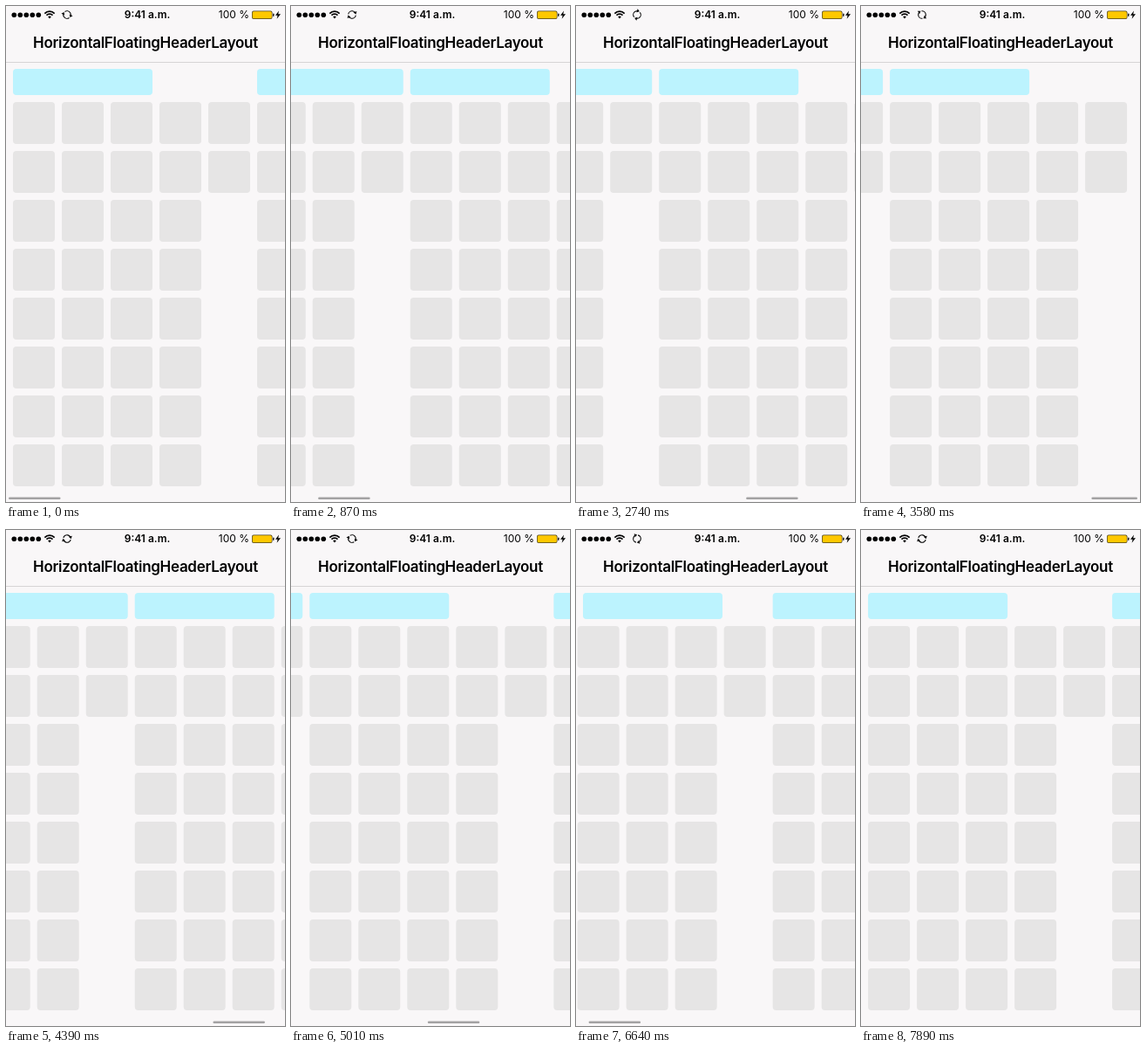
Animation of 320x568 px, one loop 7.92 s. Source, as an HTML page with a canvas:

```html
<!DOCTYPE html>
<html lang="en">
<head>
<meta charset="utf-8">
<title>HorizontalFloatingHeaderLayout</title>
<style>
  html, body { margin: 0; width: 100%; height: 100%; overflow: hidden; background: #f9f7f8; }
  #stage { position: relative; width: 320px; height: 568px; overflow: hidden; }
  canvas { position: absolute; left: 0; top: 0; width: 320px; height: 568px; }
  .text {
    position: absolute; color: #000; white-space: nowrap;
    font-family: Inter, "Liberation Sans", sans-serif;
  }
  .bar { top: 2px; font-size: 12px; line-height: 16px; }
  #clock { left: 0; width: 324px; text-align: center; font-weight: 600; }
  #charge { right: 41px; }
  #title {
    left: 0; top: 31px; width: 320px; text-align: center;
    font-size: 17px; line-height: 22px; font-weight: 600; letter-spacing: -0.3px;
  }
</style>
</head>
<body>
<div id="stage">
  <canvas id="view"></canvas>
  <div class="text bar" id="clock">9:41 a.m.</div>
  <div class="text bar" id="charge">100 %</div>
  <div class="text" id="title">HorizontalFloatingHeaderLayout</div>
</div>
<script>
const W = 320, H = 568, LOOP = 7920;
const PAD = 8, CELL = 48, STEP = 56, ROWS = 8;
const SECTIONS = 6, SECTION_W = 272, SECTION_STEP = 280, HEADER_W = 160;
const CONTENT_W = PAD + SECTIONS * SECTION_STEP;
const MAX = CONTENT_W - W;
const SPRING = 8.5;

const canvas = document.getElementById('view');
const ctx = canvas.getContext('2d');
const ratio = window.devicePixelRatio || 1;
canvas.width = W * ratio;
canvas.height = H * ratio;

// Each key: time in ms, scroll offset, speed in px/s
const forward = [[180, 0, 0], [1640, 497.3, 450], [2740, 1032, 800], [3200, MAX, 462]];
const back = [[4055, MAX, 0], [5010, 827.3, -600], [5920, 283, -450], [7050, 0, -123]];

function hermite(keys, t) {
  if (t <= keys[0][0]) return keys[0][1];
  const i = keys.findIndex(k => k[0] >= t);
  const [t0, p0, v0] = keys[i - 1], [t1, p1, v1] = keys[i];
  const d = (t1 - t0) / 1000, u = (t - t0) / (t1 - t0);
  const u2 = u * u, u3 = u2 * u;
  return (2 * u3 - 3 * u2 + 1) * p0 + (u3 - 2 * u2 + u) * d * v0 +
    (3 * u2 - 2 * u3) * p1 + (u3 - u2) * d * v1;
}

// Critically damped bounce past an edge
function bounce([start, edge, speed], t) {
  const s = (t - start) / 1000;
  return edge + speed * s * Math.exp(-SPRING * s);
}

function offsetAt(t) {
  if (t < 3200) return hermite(forward, t);
  if (t < 4055) return bounce(forward[3], t);
  if (t < 7050) return hermite(back, t);
  return bounce(back[3], t);
}

function box(x, y, w, h, r, color) {
  if (x >= W || x + w <= 0) return;
  ctx.fillStyle = color;
  ctx.beginPath();
  ctx.roundRect(x, y, w, h, r);
  ctx.fill();
}

function drawSections(offset) {
  for (let s = 0; s < SECTIONS; s++) {
    const left = PAD + s * SECTION_STEP - offset;
    const headerX = Math.min(Math.max(PAD, left), left + SECTION_W - HEADER_W);
    box(headerX, 72, HEADER_W, 30, 4, '#bcf3fe');
    for (let c = 0; c < 5; c++) {
      const rows = c < 4 ? ROWS : 2;
      for (let r = 0; r < rows; r++) {
        box(left + c * STEP, 110 + r * STEP, CELL, CELL, 4, '#e6e5e5');
      }
    }
  }
}

function drawIndicator(offset, t) {
  const track = W - 6, full = track * W / CONTENT_W;
  const over = Math.max(0, -offset, offset - MAX);
  const width = full - over;
  const p = Math.min(1, Math.max(0, offset / MAX));
  const x = offset > MAX ? 3 + track - width : 3 + p * (track - full);
  ctx.globalAlpha = Math.min(1, Math.max(0, (7800 - t) / 250));
  box(x, 562.5, width, 2.5, 1.25, '#a3a2a3');
  ctx.globalAlpha = 1;
}

function drawSignal() {
  ctx.fillStyle = ctx.strokeStyle = '#000';
  for (let i = 0; i < 5; i++) {
    ctx.beginPath();
    ctx.arc(9.3 + i * 7, 10.3, 2.8, 0, 7);
    ctx.fill();
  }
  ctx.lineWidth = 1.7;
  const a = -Math.PI * 3 / 4, b = -Math.PI / 4;
  for (const r of [5, 8]) {
    ctx.beginPath();
    ctx.arc(50, 14.2, r, a, b);
    ctx.stroke();
  }
  ctx.beginPath();
  ctx.moveTo(50, 14.4);
  ctx.arc(50, 14.2, 2.6, a, b);
  ctx.fill();
}

function drawSync(t) {
  ctx.save();
  ctx.translate(70, 10);
  ctx.rotate(t / 1000 * Math.PI * 2 + 0.5);
  ctx.lineWidth = 1.1;
  for (let i = 0; i < 2; i++) {
    ctx.rotate(Math.PI);
    ctx.beginPath();
    ctx.arc(0, 0, 4.3, 0.45, Math.PI - 0.25);
    ctx.stroke();
    ctx.beginPath();
    ctx.moveTo(-6.3, 2.2);
    ctx.lineTo(-4.5, -1);
    ctx.lineTo(-2.2, 1.8);
    ctx.fill();
  }
  ctx.restore();
}

function drawBattery() {
  box(282, 5.5, 23.5, 9.5, 2, '#4a4020');
  box(282.7, 6.2, 22.1, 8.1, 1.5, '#ffc800');
  box(306, 8.5, 1.5, 3.5, 1, '#222');
  ctx.fillStyle = '#000';
  ctx.beginPath();
  ctx.moveTo(313, 5.5);
  ctx.lineTo(309, 10.8);
  ctx.lineTo(311.6, 10.8);
  ctx.lineTo(310.6, 14.8);
  ctx.lineTo(315, 9.2);
  ctx.lineTo(312.2, 9.2);
  ctx.fill();
}

function draw(now) {
  const t = now % LOOP, offset = offsetAt(t);
  ctx.setTransform(ratio, 0, 0, ratio, 0, 0);
  ctx.fillStyle = '#f9f7f8';
  ctx.fillRect(0, 0, W, H);
  drawSections(offset);
  drawIndicator(offset, t);
  ctx.fillStyle = '#d6d4d5';
  ctx.fillRect(0, 64, W, 1);
  drawSignal();
  drawSync(t);
  drawBattery();
}

const start = performance.now();
function frame() {
  draw(performance.now() - start);
  requestAnimationFrame(frame);
}
frame();
</script>
</body>
</html>
```
